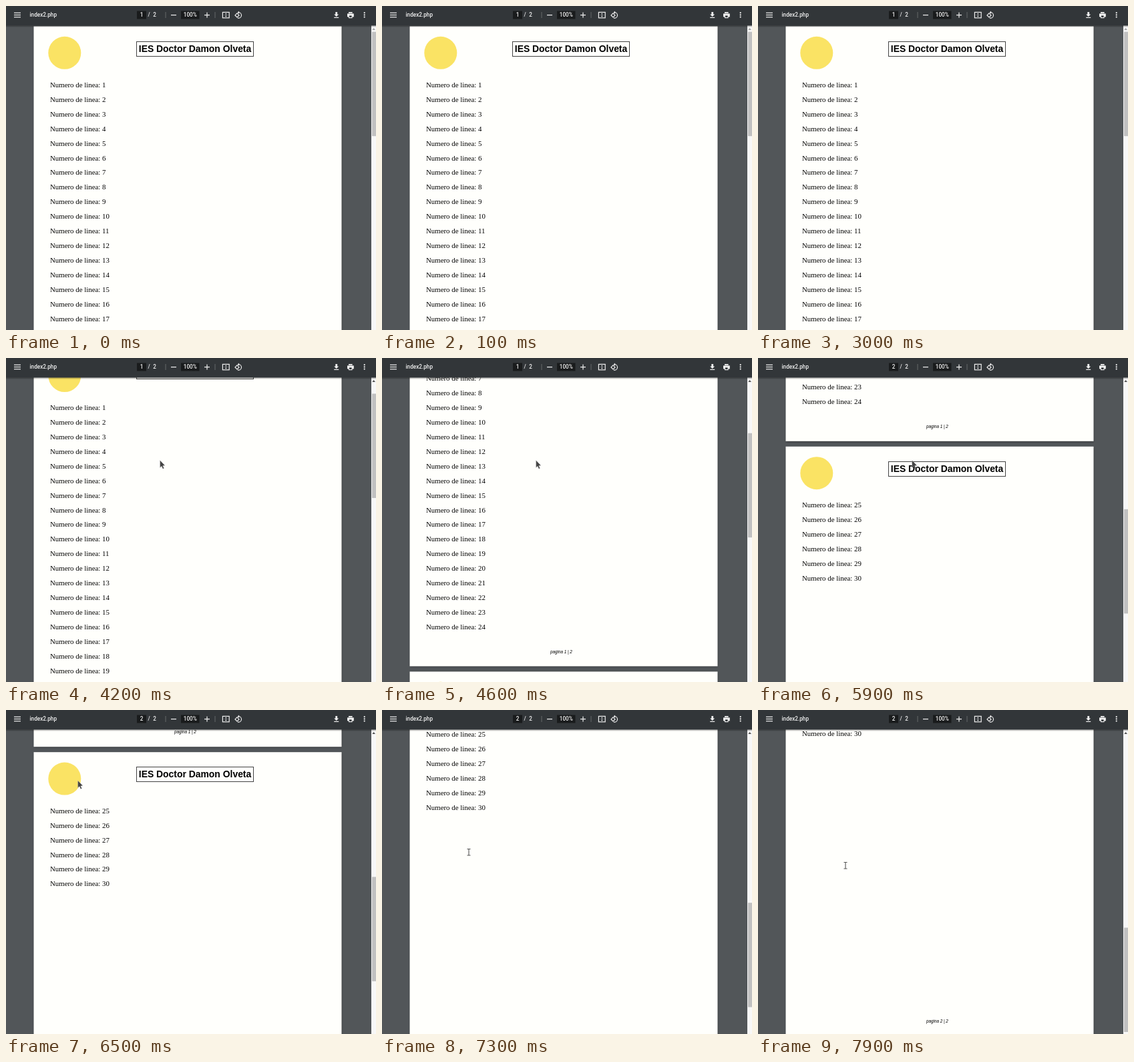
These frames come from a looping animation (554x486 px, 8 s). An HTML page with a canvas:

```html
<!DOCTYPE html>
<html lang="es">
<head>
<meta charset="utf-8">
<title>index2.php</title>
<style>
html, body { margin: 0; width: 100%; height: 100%; overflow: hidden; background: #525659; }
canvas { display: block; }
</style>
</head>
<body>
<canvas id="stage" width="554" height="486"></canvas>
<script>
const c = document.getElementById('stage').getContext('2d');
const LOOP = 8000, STEP = 100;
const PAGE = { x: 41.5, y: 31, w: 461, h: 651, pitch: 659 };

// [time, value...] keys, linear in between
const SCROLL = [[4100, 0], [4600, 219], [4800, 244], [5000, 244], [5300, 413.2], [5400, 417],
  [5500, 417], [5900, 556.6], [6400, 626.2], [6600, 626.2], [7300, 741], [7900, 851.5]];
const POINTER = [[3100, 345, 392], [3200, 117, 114], [3300, 117, 114], [4000, 230.6, 153.6],
  [6300, 230.6, 153.6], [6500, 107.6, 106], [6900, 130, 213], [7500, 130, 213], [7900, 131, 233]];

function at(keys, t) {
  const i = keys.findIndex(k => k[0] > t);
  if (i === 0) return keys[0].slice(1);
  if (i < 0) return keys[keys.length - 1].slice(1);
  const a = keys[i - 1], b = keys[i], f = (t - a[0]) / (b[0] - a[0]);
  return a.slice(1).map((v, j) => v + (b[j + 1] - v) * f);
}

function rect(x, y, w, h, color) {
  c.fillStyle = color;
  c.fillRect(x, y, w, h);
}

function text(s, x, y, font, color = '#000', align = 'left') {
  c.font = font;
  c.fillStyle = color;
  c.textAlign = align;
  c.fillText(s, x, y);
}

function poly(points, fill) {
  c.beginPath();
  points.forEach(([x, y]) => c.lineTo(x, y));
  c.closePath();
  c.fillStyle = fill;
  c.fill();
}

function drawPage(n, scroll) {
  const top = PAGE.y + (n - 1) * PAGE.pitch - scroll;
  c.save();
  c.shadowColor = 'rgba(0,0,0,.45)';
  c.shadowBlur = 3;
  c.shadowOffsetY = 1;
  rect(PAGE.x, top - .6, PAGE.w, PAGE.h, '#fffffc');
  c.restore();

  c.fillStyle = '#fae364';
  c.beginPath();
  c.arc(87.8, top + 39.3, 24.5, 0, 7);
  c.fill();

  const boxTop = Math.floor(top + 22);
  c.strokeStyle = '#444';
  c.lineWidth = 1;
  c.strokeRect(195.5, boxTop + .5, 175, 22);
  text('IES Doctor Damon Olveta', 283, boxTop + 16,
    'bold 13.92px "Liberation Sans", Arial, sans-serif', '#000', 'center');

  const first = n === 1 ? 1 : 25, last = n === 1 ? 24 : 30;
  for (let i = first; i <= last; i++)
    text('Numero de linea: ' + i, 66, Math.round(top + 91.1 + (i - first) * 21.9),
      '10.85px "Liberation Serif", Times, serif');
  text(`pagina ${n} | 2`, 252, Math.round(top + 630.6),
    'italic 6.3px "Liberation Sans", Arial, sans-serif');
}

function drawScrollbar(scroll) {
  rect(547, 29, 7, 457, '#f8f8f8');
  poly([[548.3, 36], [553, 36], [550.6, 33]], scroll > 0 ? '#505050' : '#a3a3a3');
  rect(548, 38.7 + scroll * .338, 6, 156.5, '#c1c1c1');
}

function drawToolbar(page) {
  const ink = '#f1f1f1', font = '500 8.2px Roboto, sans-serif';
  const shade = c.createLinearGradient(0, 29.5, 0, 32);
  shade.addColorStop(0, 'rgba(0,0,0,.35)');
  shade.addColorStop(1, 'rgba(0,0,0,0)');
  rect(0, 29.5, 554, 2.5, shade);
  rect(0, 0, 554, 29.5, '#323639');
  for (const y of [9.7, 12.9, 16.1]) rect(12, y, 10, 1.2, ink);
  text('index2.php', 35.5, 16.4, font, ink);

  rect(196, 7.5, 14, 12, '#191b1c');
  text(page, 203, 16.4, font, ink, 'center');
  text('/', 212.5, 16.4, font, ink);
  text('2', 220.3, 16.4, font, ink);
  rect(238.5, 9, 1, 9, '#65686b');
  rect(247, 13, 8, 1.2, ink);
  rect(262, 7.5, 27.5, 12, '#191b1c');
  text('100%', 275.8, 16.4, font, ink, 'center');
  rect(297, 13, 8, 1.2, ink);
  rect(300.4, 9.6, 1.2, 8, ink);
  rect(312.5, 9, 1, 9, '#65686b');

  // fit to page
  c.strokeStyle = ink;
  c.lineWidth = 1.2;
  c.strokeRect(324.4, 9.4, 9.8, 8.4);
  poly([[327.6, 12.6], [331, 12.6], [329.3, 10.8]], ink);
  poly([[327.6, 14.6], [331, 14.6], [329.3, 16.4]], ink);

  // rotate
  c.beginPath();
  c.moveTo(346, 10.9);
  c.lineTo(349, 13.9);
  c.lineTo(346, 16.9);
  c.lineTo(343, 13.9);
  c.closePath();
  c.stroke();
  c.beginPath();
  c.arc(348.2, 13.9, 4.3, -1.5, 1.9);
  c.stroke();
  poly([[349, 7.6], [349, 11.8], [346.6, 9.7]], ink);

  // download
  rect(493.3, 9, 2.8, 4, ink);
  poly([[491.2, 12.4], [498.2, 12.4], [494.7, 15.9]], ink);
  rect(491.2, 16.8, 7, 1.2, ink);

  // print
  rect(513, 9, 5.6, 1.8, ink);
  rect(511, 11.4, 9.8, 5, ink);
  rect(513, 13.6, 5.6, 4.6, ink);
  rect(514, 14.4, 3.6, 2.6, '#323639');

  for (const y of [10.2, 13.4, 16.6]) {
    c.beginPath();
    c.arc(536.7, y, 1.1, 0, 7);
    c.fillStyle = ink;
    c.fill();
  }
}

function drawPointer(t) {
  if (t < 3100) return;
  const [x, y] = at(POINTER, t);
  const beam = (t >= 3200 && t < 3500) || t >= 6700;
  if (beam) {
    rect(x - .5, y - 4, 1, 9, '#444');
    rect(x - 2.5, y - 5, 5, 1, '#555');
    rect(x - 2.5, y + 4.5, 5, 1, '#555');
    return;
  }
  c.save();
  c.translate(x, y);
  const shape = [[0, 0], [0, 10.8], [2.4, 8.6], [4.2, 12.6], [6, 11.8], [4.2, 8], [7.4, 7.6]];
  poly(shape, '#444');
  c.strokeStyle = 'rgba(225,225,225,.6)';
  c.lineWidth = .5;
  c.stroke();
  c.restore();
}

function frame(now) {
  const t = Math.floor(now % LOOP / STEP) * STEP;
  const [scroll] = at(SCROLL, t);
  rect(0, 0, 554, 486, '#525659');
  drawPage(1, scroll);
  drawPage(2, scroll);
  drawScrollbar(scroll);
  drawToolbar(scroll > 430 ? 2 : 1);
  drawPointer(t);
  requestAnimationFrame(frame);
}
requestAnimationFrame(frame);
</script>
</body>
</html>
```
